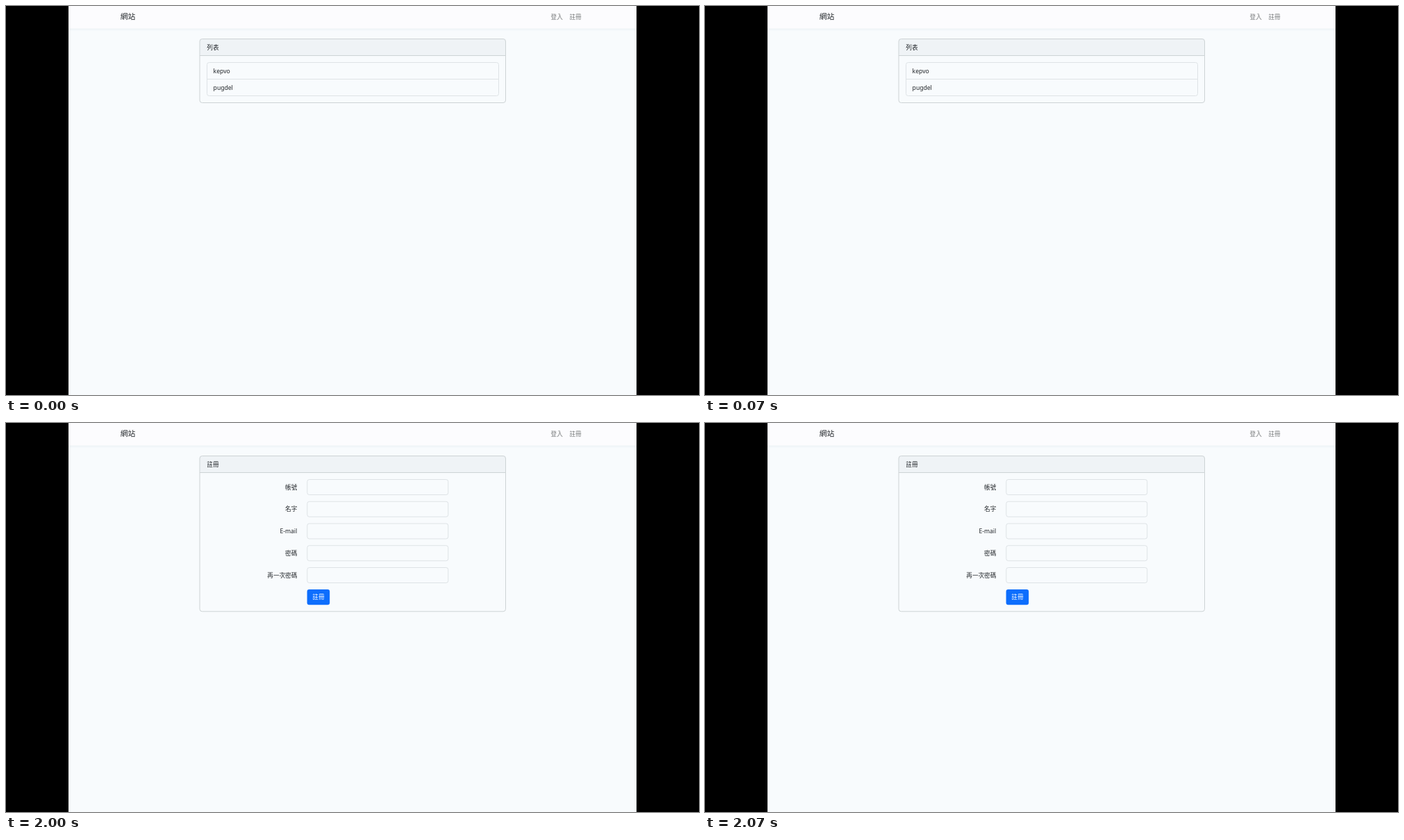
Animation, 998 px wide and 561 px high, one loop 3 s. Source, as an HTML page:

```html
<!DOCTYPE html>
<html lang="zh-Hant">
<head>
<meta charset="utf-8">
<title>網站</title>
<style>
  html, body { margin: 0; width: 100%; height: 100%; overflow: hidden; background: #000; }
  svg { display: block; width: 998px; height: 561px; }
  text { font-family: "Noto Sans", "Noto Sans CJK TC", "Noto Sans CJK", sans-serif; fill: #212529; }
  .nav { fill: #fcfcfe; }
  .body { fill: #f8fbfd; }
  .muted { fill: #777a7b; }
  .light { fill: #fff; }
  .link { fill: #2f7df0; text-decoration: underline; }
  .card { fill: none; stroke: #cdd3d5; }
  .head { fill: #eff3f6; }
  .field { fill: none; stroke: #dee3e6; }
  .button { fill: #0d6efd; }
</style>
</head>
<body>
<svg id="stage" viewBox="0 0 998 561" xmlns="http://www.w3.org/2000/svg"></svg>
<script>
const NS = 'http://www.w3.org/2000/svg';
const LOOP = 3000;
const stage = document.getElementById('stage');

function add(parent, tag, attrs, content = '') {
  const el = document.createElementNS(NS, tag);
  for (const key in attrs) el.setAttribute(key, attrs[key]);
  el.textContent = content;
  return parent.appendChild(el);
}

// Drawing helpers for one page; text is placed by its vertical centre.
function makePage(size) {
  const g = add(stage, 'g', {});
  const rect = (cls, x, y, right, bottom, rx = 0) =>
    add(g, 'rect', { class: cls, x, y, width: right - x, height: bottom - y, rx });
  const line = (cls, x1, x2, y) => add(g, 'line', { class: cls, x1, x2, y1: y, y2: y });
  const text = (str, x, mid, cls = '', anchor = 'start', fontSize = size) =>
    add(g, 'text', {
      class: cls, x, y: mid + fontSize * 0.38,
      'text-anchor': anchor, 'font-size': fontSize
    }, str);
  return { g, rect, line, text, size };
}

function frame(p, { left, right, navBottom, brandX, links, navMid, card, headLine, title }) {
  p.rect('body', left, 0, right, 561);
  ['#eaeff3', '#f0f4f8', '#f4f8fb'].forEach((fill, i) =>
    p.rect('', left, navBottom + i, right, navBottom + i + 1).setAttribute('fill', fill));
  p.rect('nav', left, 0, right, navBottom);
  p.text('網站', brandX, navMid - 0.6, '', 'start', p.size * 1.25);
  p.text('登入', links[0], navMid, 'muted');
  p.text('註冊', links[1], navMid, 'muted');

  const [x, y, x2, y2] = card;
  p.rect('head', x, y, x2, headLine, 3);
  p.rect('card', x, y, x2, y2, 3.5);
  p.line('card', x, x2, headLine);
  p.text(title, x + p.size * 1.2, (y + headLine) / 2);
}

const narrow = {
  left: 90, right: 908, navBottom: 32.5, brandX: 164.8, links: [784.6, 811.4], navMid: 16,
  headLine: 71.5
};

function listPage() {
  const p = makePage(8.6);
  frame(p, { ...narrow, card: [279, 47.5, 719.5, 139.5], title: '列表' });
  p.rect('field', 289.5, 81.5, 709.5, 129.5, 3);
  p.line('field', 289.5, 709.5, 105.5);
  p.text('kepvo', 298.6, 93.6);
  p.text('pugdel', 298.6, 117.6);
  return p.g;
}

function loginPage() {
  const p = makePage(9.1);
  frame(p, {
    left: 64, right: 934, navBottom: 35, brandX: 143.5, links: [802.6, 831.2], navMid: 17,
    card: [264.5, 50.5, 733.5, 214.5], headLine: 76, title: '登入'
  });
  ['帳號', '密碼'].forEach((label, i) => {
    const y = 86.5 + i * 34;
    p.text(label, 414, y + 11.5, '', 'end');
    p.rect('field', 430, y, 645.7, y + 23.2, 3.5);
  });
  p.rect('field', 430, 157, 438.5, 165.5, 2);
  p.text('記得我', 443.4, 161);
  p.rect('button', 429.6, 180, 464, 203.6, 3.5);
  p.text('登入', 446.8, 191.7, 'light', 'middle');
  p.text('忘記密碼?', 472.8, 191.7, 'link');
  return p.g;
}

function registerPage() {
  const p = makePage(8.6);
  frame(p, { ...narrow, card: [279, 47.5, 719.5, 271.8], title: '註冊' });
  ['帳號', '名字', 'E-mail', '密碼', '再一次密碼'].forEach((label, i) => {
    const y = 81.5 + i * 31.75;
    p.text(label, 419.3, y + 10.8, '', 'end');
    p.rect('field', 433.8, y, 636.8, y + 22, 3);
  });
  p.rect('button', 433.6, 240, 466.2, 262.2, 3);
  p.text('註冊', 449.9, 251, 'light', 'middle');
  return p.g;
}

const pages = [listPage(), loginPage(), registerPage()];
pages.forEach((page, i) => {
  const steps = [0, 1, 2, 3].map(k => ({
    offset: k / 3, opacity: k % 3 === i ? 1 : 0, easing: 'step-end'
  }));
  page.animate(steps, { duration: LOOP, iterations: Infinity });
});
</script>
</body>
</html>
```
